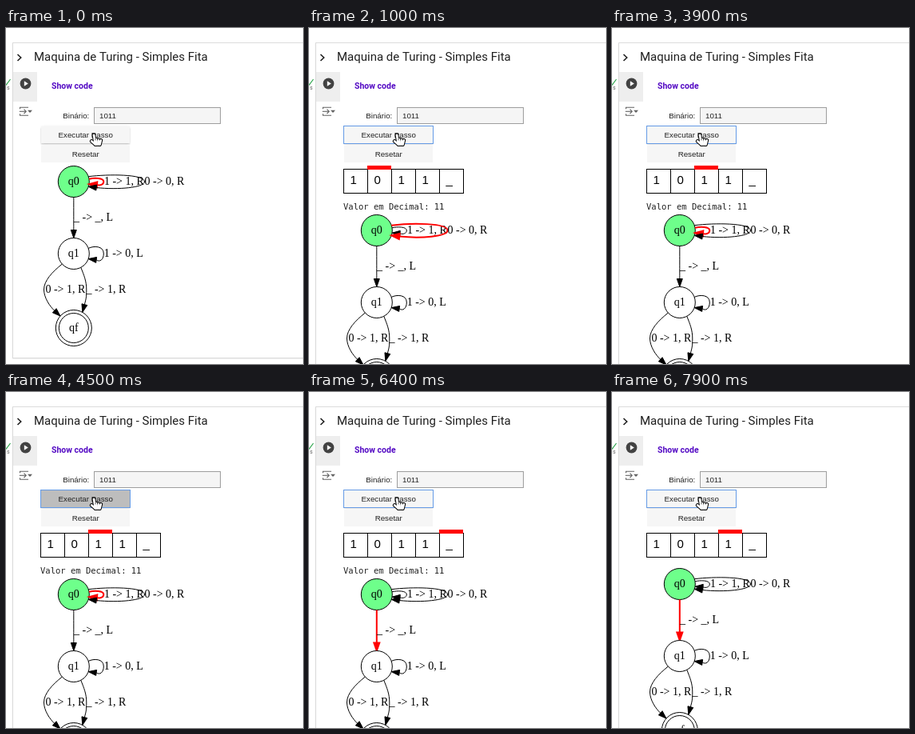
Recreate the animation shown at these times as an HTML page with a canvas. Size 372 px wide and 420 px high, loop 8000 ms.

```html
<!DOCTYPE html>
<html lang="pt">
<head>
<meta charset="utf-8">
<title>Maquina de Turing</title>
<style>
  html, body { margin: 0; width: 100%; height: 100%; overflow: hidden; background: #fff; }
  canvas { display: block; width: 372px; height: 420px; }
</style>
</head>
<body>
<canvas id="stage"></canvas>
<script>
const W = 372, H = 420, LOOP = 8000;
const canvas = document.getElementById('stage');
const ctx = canvas.getContext('2d');
const ratio = window.devicePixelRatio || 1;
canvas.width = W * ratio;
canvas.height = H * ratio;

const SANS = '"Liberation Sans", Arial, sans-serif';
const SERIF = '14px "Liberation Serif", "Times New Roman", serif';
const MONO = '10.5px "DejaVu Sans Mono", monospace';
const ROBOTO = 'Roboto, sans-serif';
const RED = '#ff0000';
const NODE = 19.5, FINAL = 22.5, ROW = 90, ARROW = 10, CELL = 30;

// Each click (press, hold) leads to a new head position and edge at time "at".
const steps = [
  { at: 0, active: 'one', y: 192 },
  { press: 200, hold: 200, at: 1000, head: 1, active: 'zero', y: 253, decimal: true },
  { press: 3100, hold: 200, at: 3900, head: 2, active: 'one', y: 253, decimal: true },
  { press: 4500, hold: 200, at: 5200, head: 3, active: 'one', y: 253, decimal: true },
  { press: 5600, hold: 300, at: 6400, head: 4, active: 'down', y: 253, decimal: true },
  { press: 7000, hold: 300, at: 7900, head: 3, active: 'down', y: 240 }
];

function rect(x, y, w, h, color) {
  ctx.fillStyle = color;
  ctx.fillRect(x, y, w, h);
}

function frame(x, y, w, h, color) {
  ctx.lineWidth = 1;
  ctx.strokeStyle = color;
  ctx.strokeRect(x + 0.5, y + 0.5, w - 1, h - 1);
}

function text(str, x, y, font, color = '#000', align = 'left') {
  ctx.font = font;
  ctx.fillStyle = color;
  ctx.textAlign = align;
  ctx.fillText(str, x, y);
}

function line(points, color, width) {
  ctx.beginPath();
  points.forEach(([x, y]) => ctx.lineTo(x, y));
  ctx.strokeStyle = color;
  ctx.lineWidth = width;
  ctx.stroke();
}

function fillPoly(points, color) {
  ctx.beginPath();
  points.forEach(([x, y]) => ctx.lineTo(x, y));
  ctx.closePath();
  ctx.fillStyle = color;
  ctx.fill();
}

function shadowRect(x, y, w, h, fill, dy, blur, alpha) {
  ctx.save();
  ctx.shadowColor = `rgba(0,0,0,${alpha})`;
  ctx.shadowOffsetY = dy * ratio;
  ctx.shadowBlur = blur * ratio;
  rect(x, y, w, h, fill);
  ctx.restore();
}

function drawCard(hasTape) {
  const bottom = hasTape ? H + 20 : 412;
  shadowRect(8, 18, W, bottom - 17, '#dcdcdc', 0.5, 1.5, 0.15);
  rect(9, 19, W, bottom - 19, '#fff');
  rect(9, 55, 30, 37, '#eeeeee');

  line([[14.5, 33], [18.7, 37], [14.5, 41]], '#212121', 1.6);
  text('Maquina de Turing - Simples Fita', 35, 41, `15px ${ROBOTO}`, '#212121');
  text('Show code', 57, 76, `600 10.5px ${ROBOTO}`, '#540bc4');

  line([[0, 71.5], [5.5, 64]], '#22a043', 1.1);
  text('s', 1, 77, `7px ${ROBOTO}`, '#666');

  ctx.beginPath();
  ctx.arc(24.5, 69.5, 6.9, 0, 7);
  ctx.fillStyle = '#424242';
  ctx.fill();
  fillPoly([[22.8, 66.3], [22.8, 72.7], [27.8, 69.5]], '#fff');

  const grey = '#616161';
  for (const side of [-1, 1]) {
    const y = 104.3 + 5 * side;
    line([[17.5, y - 2 * side], [17.5, y], [28, y]], grey, 1.1);
  }
  line([[16.8, 104.3], [25, 104.3]], grey, 1.1);
  line([[22.5, 101.6], [25.2, 104.3], [22.5, 107]], grey, 1.1);
  fillPoly([[27, 102.8], [33, 102.8], [30, 106]], grey);
}

function drawForm(t) {
  const click = steps.find(s => t >= s.press && t < s.press + s.hold);
  const pressed = click && t >= click.press + 100;

  ctx.save();
  ctx.beginPath();
  ctx.rect(43, 110, 113, 37);
  ctx.clip();
  if (pressed) shadowRect(44, 123, 111, 21, '#eee', 0.75, 7.5, 0.12);
  shadowRect(44, 123, 111, 21, '#eee', 1.5, 1.5, 0.14);
  shadowRect(44, 123, 111, 21, click ? '#bdbdbd' : '#f6f6f6', 0.75, 3.75, 0.12);
  ctx.restore();
  if (t >= steps[1].press) frame(43, 122, 113, 23, '#659be6');
  rect(44, 147, 111, 21, '#f6f6f6');

  const font = `9.75px ${SANS}`;
  text('Binário:', 104.3, 113, font, '#222', 'right');
  rect(110, 99, 159, 21, '#f5f5f5');
  frame(110, 99, 159, 21, '#9e9e9e');
  text('1011', 117, 113, font, '#222');
  text('Executar Passo', 99.7, 137, font, '#222', 'center');
  text('Resetar', 99.7, 161, font, '#222', 'center');
}

function drawTape({ head, decimal }) {
  [...'1011_'].forEach((symbol, i) => {
    const x = 43 + CELL * i;
    frame(x, 176, CELL + 1, 31, '#000');
    text(symbol, x + 8.6, 195, `15px ${SANS}`);
  });
  rect(43 + CELL * head, 172, CELL, 5, RED);
  if (decimal) text('Valor em Decimal: 11', 43, 227, MONO, '#212121');
}

function label(str, x, y) {
  text(str, x, y + 4, SERIF, '#000', 'center');
}

function node(y, name, radii, fill = '#fff') {
  ctx.lineWidth = 1;
  ctx.strokeStyle = '#000';
  for (const r of radii) {
    ctx.beginPath();
    ctx.arc(0, y, r, 0, 7);
    ctx.fillStyle = fill;
    ctx.fill();
    ctx.stroke();
  }
  label(name, 0, y);
}

// Cubic segments from a start point, ending in an arrowhead at the tip.
function edge(start, curves, tip, active) {
  ctx.strokeStyle = ctx.fillStyle = active ? RED : '#000';
  ctx.lineWidth = active ? 2 : 1;
  ctx.beginPath();
  ctx.moveTo(...start);
  curves.forEach(c => ctx.bezierCurveTo(...c));
  ctx.stroke();

  const [bx, by] = curves.at(-1).slice(4);
  const dx = tip[0] - bx, dy = tip[1] - by;
  const k = 3.5 / Math.hypot(dx, dy);
  ctx.beginPath();
  ctx.moveTo(bx - dy * k, by + dx * k);
  ctx.lineTo(...tip);
  ctx.lineTo(bx + dy * k, by - dx * k);
  ctx.closePath();
  ctx.fill();
  ctx.stroke();
}

// Edge from a node back to itself, leaving and entering "gap" off its middle.
function selfLoop(y, gap, reach, active) {
  const x = Math.sqrt(NODE ** 2 - gap ** 2);
  const end = x + ARROW, rise = gap * 1.5;
  edge([x, y - gap], [
    [x + (reach - x) * 0.35, y - rise, reach, y - rise, reach, y],
    [reach, y + rise * 0.8, end + (reach - end) * 0.45, y + rise * 1.1, end, y + gap * 1.2]
  ], [x, y + gap], active);
}

// Bowed edge from q1 down to qf, leaving at x0, entering at x1.
function bow(x0, bulge, x1) {
  const y0 = ROW + Math.sqrt(NODE ** 2 - x0 ** 2);
  const y1 = 183 - Math.sqrt(FINAL ** 2 - x1 ** 2);
  const angle = Math.atan2(-19, bulge - x1);
  const back = d => [x1 + d * Math.cos(angle), y1 + d * Math.sin(angle)];
  edge([x0, y0], [
    [x0 + (bulge - x0) * 0.55, y0 + 10, bulge, 124, bulge, 135],
    [bulge, 145, ...back(18), ...back(ARROW)]
  ], [x1, y1]);
}

function drawGraph({ y, active }) {
  ctx.save();
  ctx.translate(84.8, y);
  node(0, 'q0', [NODE], '#6eff8b');
  selfLoop(0, 3.2, 37.5, active === 'one');
  label('1 -> 1, R', 63.1, 0);
  selfLoop(0, 6.3, 88.7, active === 'zero');
  label('0 -> 0, R', 113.7, 0);
  const tip = ROW - NODE, base = tip - ARROW;
  edge([0, NODE], [[0, NODE, 0, base, 0, base]], [0, tip], active === 'down');
  label('_ -> _, L', 24.8, 45);
  node(ROW, 'q1', [NODE]);
  selfLoop(ROW, 6.6, 37.5);
  label('1 -> 0, L', 62.4, ROW);
  bow(-14.5, -37.3, -16.8);
  label('0 -> 1, R', -10.4, 135);
  bow(9, 16, 11);
  label('_ -> 1, R', 40.6, 135);
  node(183, 'qf', [FINAL, FINAL - 4]);
  ctx.restore();
}

// Fingers and thumb as round strokes, outlined in black.
function drawHand() {
  ctx.save();
  ctx.lineCap = 'round';
  for (const [color, width] of [['#000', 4.8], ['#fff', 2.8]]) {
    for (let i = 0; i < 4; i++) {
      const top = i ? 138.6 + 0.6 * i : 133.8;
      line([[110 + 2.9 * i, top], [112 + 1.8 * i, 145.6]], color, width);
    }
    line([[107.2, 141.5], [112, 145.5]], color, width);
  }
  for (let i = 0; i < 3; i++) {
    const x = 112 + 2.8 * i;
    line([[x, 138.5], [x, 140]], '#000', 0.7);
  }
  ctx.restore();
}

function draw(t) {
  const state = steps.findLast(s => t >= s.at);
  const hasTape = state.head !== undefined;
  ctx.setTransform(ratio, 0, 0, ratio, 0, 0);
  rect(0, 0, W, H, '#fff');
  drawCard(hasTape);
  drawForm(t);
  if (hasTape) drawTape(state);
  drawGraph(state);
  drawHand();
}

const begin = performance.now();
function tick() {
  draw((performance.now() - begin) % LOOP);
  requestAnimationFrame(tick);
}
tick();
</script>
</body>
</html>
```
